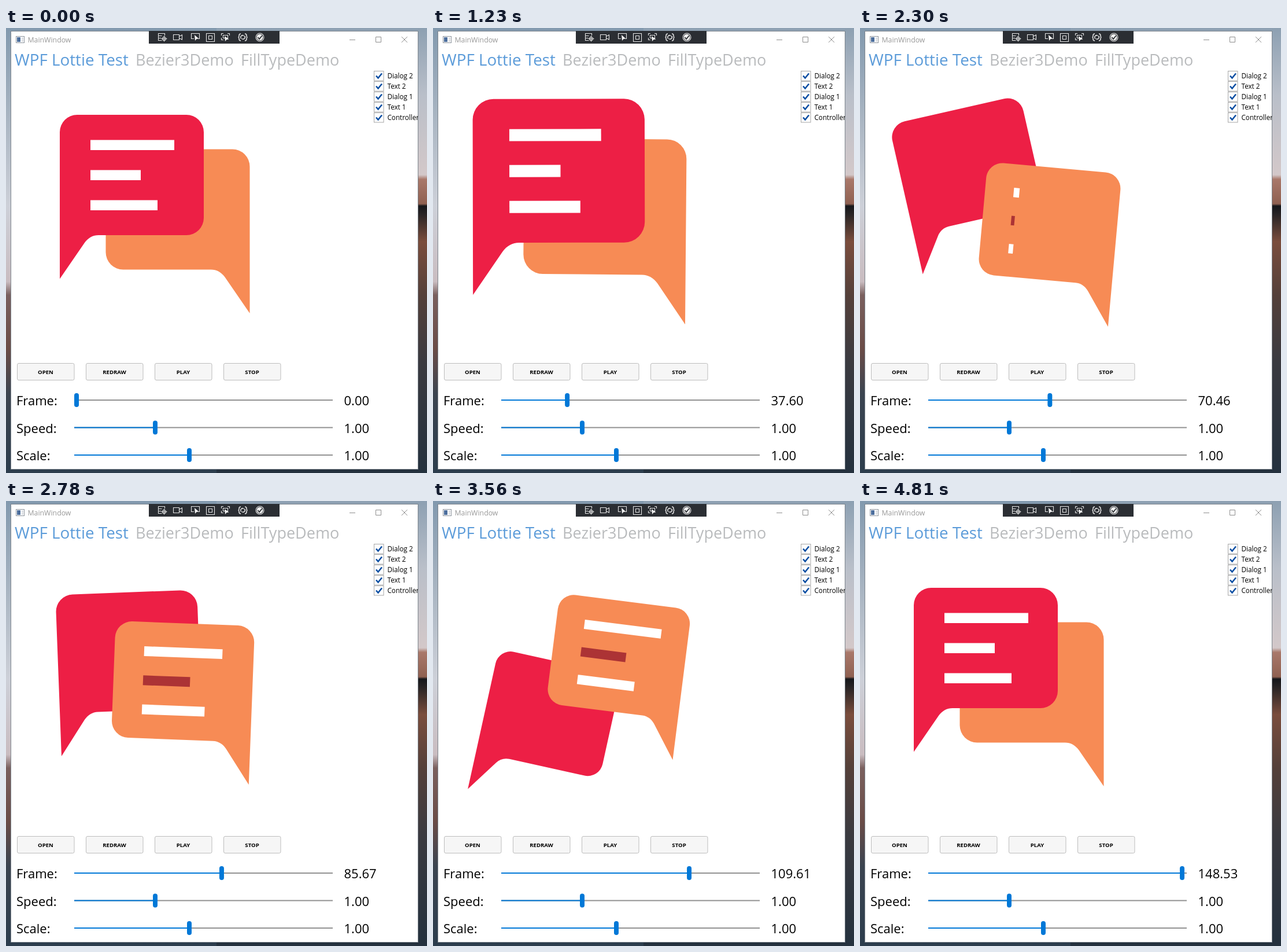
Write an HTML page that moves like this. It is 728 px wide and 769 px high and loops after 4840 ms.

```html
<!DOCTYPE html>
<html lang="en">
<head>
<meta charset="utf-8">
<title>MainWindow</title>
<style>
  html, body { margin: 0; width: 100%; height: 100%; overflow: hidden; }
  svg { display: block; width: 728px; height: 769px; font-family: "Open Sans", "Noto Sans", sans-serif; }
  .tab { font-size: 27px; fill: #b9bbbd; }
  .active { font-size: 27.8px; fill: #5b9bd9; }
  .big { font-size: 22px; }
  .small { font-size: 11.7px; }
  .btn { font-size: 9.6px; font-weight: 700; text-anchor: middle; }
</style>
</head>
<body>
<svg viewBox="0 0 728 769">
  <defs>
    <linearGradient id="west" x1="0" y1="0" x2="0" y2="1">
      <stop offset="0" stop-color="#8299ae"/>
      <stop offset=".2" stop-color="#a9b5c2"/>
      <stop offset=".4" stop-color="#cdd0d8"/>
      <stop offset=".57" stop-color="#c9bcc0"/>
      <stop offset=".6" stop-color="#7a605e"/>
      <stop offset=".72" stop-color="#6a4c47"/>
      <stop offset=".82" stop-color="#3b4450"/>
      <stop offset="1" stop-color="#2c3d4d"/>
    </linearGradient>
    <linearGradient id="east" x1="0" y1="0" x2="0" y2="1">
      <stop offset="0" stop-color="#8da0b2"/>
      <stop offset=".15" stop-color="#b9bfc9"/>
      <stop offset=".33" stop-color="#d3c8c9"/>
      <stop offset=".34" stop-color="#a9786a"/>
      <stop offset=".395" stop-color="#8f6152"/>
      <stop offset=".4" stop-color="#15171b"/>
      <stop offset=".42" stop-color="#2a2526"/>
      <stop offset=".48" stop-color="#7a4d3d"/>
      <stop offset=".6" stop-color="#54403a"/>
      <stop offset=".75" stop-color="#3a3a40"/>
      <stop offset="1" stop-color="#24313e"/>
    </linearGradient>
    <clipPath id="win"><rect x="9" y="5" width="703.5" height="757.5"/></clipPath>
  </defs>

  <rect width="364" height="769" fill="url(#west)"/>
  <rect x="364" width="364" height="769" fill="url(#east)"/>
  <rect x="8.5" y="5.5" width="704" height="757" fill="#fff" stroke="#7d858d"/>

  <!-- title bar -->
  <rect x="17.5" y="14.5" width="14" height="11" fill="#fff" stroke="#8b929b"/>
  <rect x="19" y="16" width="6" height="8" fill="#4d6f9d"/>
  <path d="M27 17.5h3M27 20h3M27 22.5h3" stroke="#b5bcc5"/>
  <text x="37.5" y="25" font-size="12.3" fill="#999">MainWindow</text>
  <path d="M594 20.5h10M639.5 15.5h9v9h-9zM684 15l10 10M694 15l-10 10" fill="none" stroke="#8e8e8e"/>

  <!-- tool strip -->
  <rect x="247" y="5" width="226" height="22" fill="#2b2e33"/>
  <g fill="none" stroke="#e4e4e4" stroke-width="1.1">
    <path d="M263.5 9.5h11M263.5 13.5h6M263.5 17.5h5M263.5 21.5h6M263.5 9v13M274.5 9v4"/>
    <circle cx="273.5" cy="18.5" r="3"/>
    <path d="M273.5 13.5v10M268.5 18.5h10"/>
    <path d="M289.5 11.5h10v9h-10zM299.5 14.5l5-2.5v8l-5-2.5"/>
    <path d="M325 18.5h-4.5v-9h14v9h-2"/>
    <path d="M346.5 9.5h14v14h-14zM350.5 13.5h6v6h-6z"/>
    <path d="M372.5 13v-3.500h3.500M383 9.5h3.500v3.500M372.500 17v3.500h3.500M375.500 12.500h8v5h-8z"/>
    <path d="M406 10q-3 0-3 3 0 3-1.500 3 1.500 0 1.500 3 0 3 3 3M413 10q3 0 3 3 0 3 1.500 3-1.500 0-1.500 3 0 3-3 3" stroke-width="1.5"/>
    <path d="M407 18.500a3 3 0 0 1 4-5M412 13.500a3 3 0 0 1-4 5" stroke-width="1.5"/>
    <circle cx="439" cy="16" r="7"/>
  </g>
  <path d="M326 12l1 10 2.500-3 4-.5zM378 14l1 9 2.500-3 4-.5z" fill="#f2f2f2"/>
  <circle cx="439" cy="16" r="5.5" fill="#f2f2f2"/>
  <path d="M435.500 16l2.500 3 5-6" fill="none" stroke="#2b2e33" stroke-width="1.8"/>

  <text class="tab active" x="15" y="64.5">WPF Lottie Test</text>
  <text class="tab" x="224" y="64.5">Bezier3Demo</text>
  <text class="tab" x="406" y="64.5">FillTypeDemo</text>

  <g id="ui" clip-path="url(#win)"></g>
  <g id="stage"></g>
</svg>

<script>
const NS = "http://www.w3.org/2000/svg";
const LOOP = 4840, STEP = 40.8;
const ui = document.getElementById("ui");
const stage = document.getElementById("stage");

function add(parent, tag, attrs, text) {
  const el = document.createElementNS(NS, tag);
  for (const k in attrs) el.setAttribute(k, attrs[k]);
  if (text !== undefined) el.textContent = text;
  parent.append(el);
  return el;
}

// Controls
["Dialog 2", "Text 2", "Dialog 1", "Text 1", "Controller"].forEach((name, i) => {
  const y = 74.5 + i * 18;
  add(ui, "rect", { x: 636.5, y, width: 16.5, height: 16.5, fill: "#fff", stroke: "#a6a6a6" });
  add(ui, "path", { d: `M640 ${y + 8}l3.5 4 6.5-8`, fill: "none", stroke: "#0b4fa3", "stroke-width": 2.6 });
  add(ui, "text", { class: "small", x: 659.5, y: y + 12.5 }, name);
});

["OPEN", "REDRAW", "PLAY", "STOP"].forEach((name, i) => {
  const x = 19.5 + i * 119;
  add(ui, "rect", { x, y: 579.5, width: 98.5, height: 29, rx: 2.5, fill: "#f6f6f6", stroke: "#bdbdbd" });
  add(ui, "text", { class: "btn", x: x + 49, y: 598 }, name);
});

function slider(name, y, pos, value) {
  add(ui, "text", { class: "big", x: 18, y: y + 9 }, name + ":");
  add(ui, "rect", { x: 118, y: y - 1, width: 447, height: 2, fill: "#929292" });
  const fill = add(ui, "rect", { x: 118, y: y - 1, height: 2, fill: "#0078d7" });
  const thumb = add(ui, "rect", { y: y - 12, width: 8, height: 24, rx: 4, fill: "#0078d7" });
  const label = add(ui, "text", { class: "big", x: 584.5, y: y + 9 });
  const set = (px, v) => {
    fill.setAttribute("width", px - 118);
    thumb.setAttribute("x", px - 4);
    label.textContent = v.toFixed(2);
  };
  set(pos, value);
  return set;
}
const setFrame = slider("Frame", 643, 122, 0);
slider("Speed", 690.5, 258, 1);
slider("Scale", 738, 317, 1);

// Speech bubbles, drawn around the centre of their bounds
const SHAPE = "M-124.5-111.5a30 30 0 0 1 30-30h189a30 30 0 0 1 30 30V36.5" +
  "a30 30 0 0 1-30 30H-57.5C-67 66.5-75.5 71-81.5 79.5L-124.5 142z";
const BARS = [145, 87, 116];

function bubble(color, flip, inks) {
  const g = add(stage, "g", {});
  add(g, "path", { d: SHAPE, fill: color, transform: `scale(${flip} 1)` });
  const bars = inks.map((ink, i) =>
    add(g, "rect", { x: -71.5, y: -98 + i * 52, height: 17.5, fill: ink }));
  return { g, bars };
}
const orange = bubble("#f78b55", -1, ["#fff", "#ac3335", "#fff"]);
const red = bubble("#ed1f45", 1, ["#fff", "#fff", "#fff"]);

// Both bubbles shrink, jump up, part, meet, part again, hold and go home.
// A pose is x, y, angle, scale.
function route(x, y, shrink, jump, middle, away) {
  const rest = [x, y, 0, 1];
  return [
    [0, rest],
    [shrink.at, [x, y, shrink.angle, .855]],
    [jump.at, [x, y, 0, jump.scale]],
    ...middle,
    [119, away], [126.5, away],
    [147.5, rest], [150, rest]
  ];
}
const redRoute = route(217.5, 291.5,
  { at: 20.3, angle: -1.45 }, { at: 41, scale: 1.22 },
  [[59, [179, 262, -17.3, .9]], [85.7, [213, 297, -2.15, .983]]],
  [189, 420, 14.7, .852]);
const orangeRoute = route(297, 351,
  { at: 22.5, angle: 2.2 }, { at: 44, scale: 1.2 },
  [[65, [329, 377, 5.8, .93]], [85.7, [304.7, 348.3, 2.2, .967]], [103, [305, 328, 2.5, .967]]],
  [337, 271.5, 15, .848]);

// Monotone cubic through the poses
function sample(keys, f, c) {
  let i = 0;
  while (i < keys.length - 2 && f >= keys[i + 1][0]) i++;
  const span = j => keys[j + 1][0] - keys[j][0];
  const val = j => keys[j][1][c];
  const slope = j => (val(j + 1) - val(j)) / span(j);
  const tangent = j => {
    if (j === 0 || j === keys.length - 1) return 0;
    const a = slope(j - 1), b = slope(j);
    if (a * b <= 0) return 0;
    const p = span(j - 1), q = span(j);
    return 3 * (p + q) / ((2 * q + p) / a + (q + 2 * p) / b);
  };
  const h = span(i), u = (f - keys[i][0]) / h, v = 1 - u;
  return val(i) * v * v * (1 + 2 * u) + val(i + 1) * u * u * (3 - 2 * u) +
    h * u * v * (v * tangent(i) - u * tangent(i + 1));
}

// Eased 0 to 1, beginning at a frame and lasting some frames
function ease(f, begin, length) {
  const u = Math.min(1, Math.max(0, (f - begin) / length));
  return u * u * (3 - 2 * u);
}

// Share of line i that is written
const DIP = [.255, .48, .37];
function redText(f, i) {
  const dip = DIP[i] * ease(f, 0, 25) * (1 - ease(f, 25, 20));
  const wiped = ease(f, 36.8 + 4.6 * i, 20);
  return (1 - dip) * (1 - wiped) + ease(f, 125.2 + 1.3 * i, 18);
}
function orangeText(f, i) {
  return ease(f, 67, 21) * (1 - ease(f, 110 - 2.7 * i, 19.5 + 4.9 * i));
}

function pose(item, keys, text, f) {
  const [x, y, angle, scale] = [0, 1, 2, 3].map(c => sample(keys, f, c).toFixed(3));
  item.g.setAttribute("transform", `translate(${x} ${y}) rotate(${angle}) scale(${scale})`);
  item.bars.forEach((bar, i) => bar.setAttribute("width", (BARS[i] * text(f, i)).toFixed(2)));
}

// The player runs slightly unevenly: counter values at a few ticks
const CLOCK = [[0, 0], [20, 25.01], [42, 52.71], [68, 85.67], [87, 109.61], [103, 130.02], [118, 148.53]];

function frameAt(t) {
  const n = Math.min(118, Math.floor(t / STEP + .3));
  const i = Math.max(1, CLOCK.findIndex(k => n <= k[0]));
  const [a, fa] = CLOCK[i - 1], [b, fb] = CLOCK[i];
  return fa + (fb - fa) * (n - a) / (b - a);
}

function draw(t) {
  const f = frameAt(t);
  setFrame(122 + f * 2.929, f);
  pose(red, redRoute, redText, f);
  pose(orange, orangeRoute, orangeText, f);
  const front = f > 66 && f < 119 ? orange : red;
  if (stage.lastChild !== front.g) stage.append(front.g);
}

function tick() {
  draw(performance.now() % LOOP);
  requestAnimationFrame(tick);
}
tick();
</script>
</body>
</html>
```
